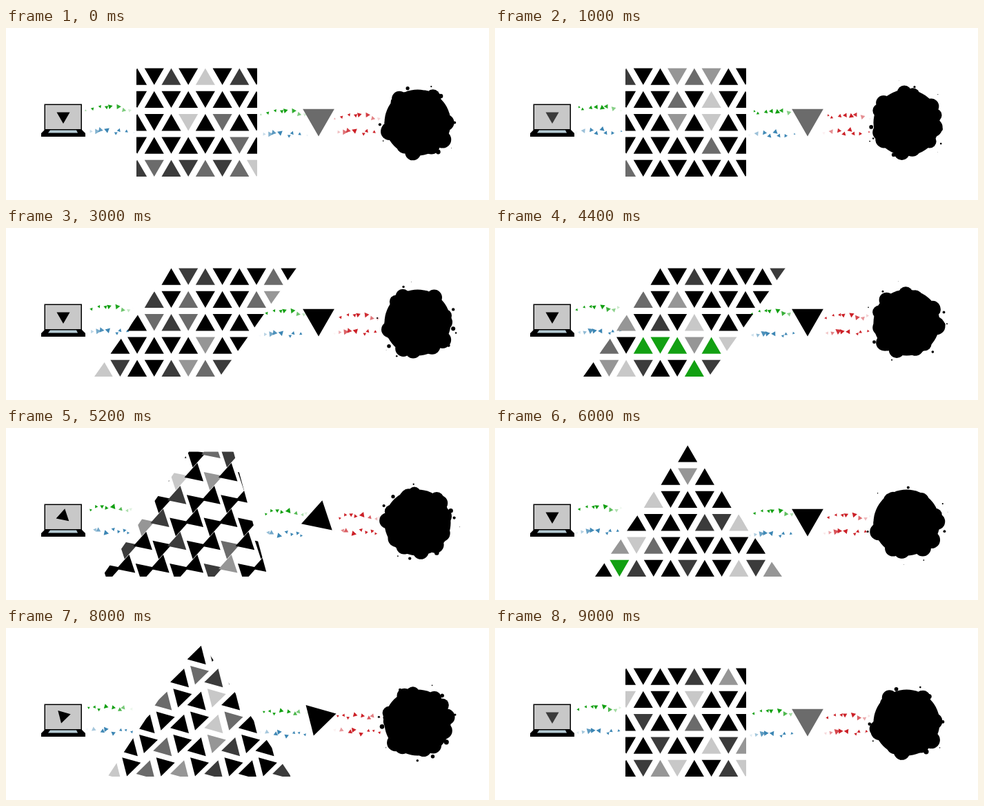
Write an HTML page with a canvas that moves like this. It is 700 by 250 pixels and loops after 9100 ms.

```html
<!DOCTYPE html>
<html>
<head>
<meta charset="utf-8">
<style>
html, body { margin: 0; width: 100%; height: 100%; overflow: hidden; background: #fff; }
canvas { display: block; }
</style>
</head>
<body>
<canvas id="stage" width="700" height="250"></canvas>
<script>
const ctx = document.getElementById('stage').getContext('2d');
const TAU = Math.PI * 2, LOOP = 9100, STEP = 100;
const GREEN = '#12a012', BLUE = '#0b7ab5', LAKE = '#3c86b4', RED = '#cc2027';
const GRAYS = ['#000', '#3b3b3b', '#6b6b6b', '#969696', '#c8c8c8'];

// Clip outlines (top left, top right, bottom right, bottom left) and lattice shift
const POSES = [
  { pts: [[189, 58], [364, 58], [364, 216], [189, 216]], shift: 0 },
  { pts: [[239, 58], [421, 58], [310, 216], [128, 216]], shift: 0 },
  { pts: [[279, 22], [281, 22], [416, 216], [145, 216]], shift: 15 }
];
const TURN_START = 1650, TURN_GAP = 3015, TURN_TIME = 1000;

// Coloured patches that swell and shrink again inside the lattice
const PATCHES = [
  { time: 1900, x: 252, y: 176, size: 66, color: BLUE },
  { time: 4400, x: 270, y: 196, size: 64, color: GREEN },
  { time: 6000, x: 166, y: 206, size: 24, color: GREEN }
];
const PATCH_LIFE = 700;

const rand = n => { const s = Math.sin(n * 127.1 + 11.7) * 43758.5453; return s - Math.floor(s); };
const mix = (a, b, k) => a + (b - a) * k;
const easeInOut = (u, p) => u < .5 ? (2 * u) ** p / 2 : 1 - (2 - 2 * u) ** p / 2;

function disc(x, y, r) {
  ctx.beginPath();
  ctx.arc(x, y, r, 0, TAU);
  ctx.fill();
}

function polygon(pts) {
  ctx.beginPath();
  pts.forEach(([x, y]) => ctx.lineTo(x, y));
  ctx.closePath();
}

function triangle(x, y, r, angle, color) {
  polygon([0, 1, 2].map(i => {
    const a = angle + i * TAU / 3;
    return [x + r * Math.sin(a), y - r * Math.cos(a)];
  }));
  ctx.fillStyle = color;
  ctx.fill();
}

// Mostly black, more rarely lighter
const flicker = (t, seed) => GRAYS[Math.floor(4.9 * rand(seed + t * .37) ** 3.2)];

function cellColor(t, x, y, seed) {
  const patch = PATCHES.find(p => {
    const life = 1 - (Math.abs(t - p.time) / PATCH_LIFE) ** 2;
    return life > 0 && Math.hypot((x - p.x) * .85, (y - p.y) * 1.4) < p.size * life;
  });
  return patch && rand(seed + patch.time) < .8 ? patch.color : flicker(t, seed);
}

function turnAt(t) {
  const k = Math.floor((t - TURN_START) / TURN_GAP);
  const u = k < 0 ? 1 : Math.min(1, (t - TURN_START - k * TURN_GAP) / TURN_TIME);
  const from = POSES[(k + 3) % 3], to = POSES[(k + 4) % 3], m = easeInOut(u, 5);
  return {
    spin: easeInOut(u, 3) * TAU / 3,
    shift: mix(from.shift, to.shift, m),
    pts: from.pts.map((p, i) => p.map((v, j) => mix(v, to.pts[i][j], m)))
  };
}

function drawLattice(t, { spin, shift, pts }) {
  ctx.save();
  polygon(pts);
  ctx.clip();
  for (let row = 0; row < 6; row++) for (let col = -6; col < 10; col++) {
    const up = (row + col) % 2 !== 0;
    const x = 239.5 + shift + col * 24.7;
    const y = 25.2 + row * 33.3 + (up ? 16.2 : 8.1);
    const color = cellColor(t, x, y, row * 17 + col + 5);
    triangle(x, y, 16.2, spin + (up ? 0 : Math.PI), color);
  }
  ctx.restore();
}

function drawLaptop(spin, color) {
  ctx.fillStyle = '#000';
  ctx.fillRect(55.5, 110.5, 54.5, 40);
  polygon([[56, 148], [110, 148], [115, 153], [115, 158], [51, 158], [51, 153]]);
  ctx.fill();
  ctx.fillStyle = '#c8c8c8';
  ctx.fillRect(57, 112, 51.5, 35);
  polygon([[64, 148.5], [102, 148.5], [104, 152.5], [61, 152.5]]);
  ctx.fillStyle = '#b4cad3';
  ctx.fill();
  triangle(83, 128, 11, spin + Math.PI, color);
}

// Packets grow on their way, then shrink and fade out
function drawLane(t, x0, y0, dir, seed, color) {
  for (let i = 0; i < 8; i++) {
    const n = seed + i;
    const u = (t * 6 / LOOP + i / 8 + rand(n) * .08) % 1;
    const fade = Math.min(1, (1 - u) / .35);
    const x = x0 + dir * u * 70;
    const y = y0 + 3 * Math.sin(u * 5 + rand(n + 30) * TAU);
    const r = (2 + 4.5 * u) * mix(.75, 1.1, rand(n + 60)) * mix(.4, 1, fade);
    ctx.globalAlpha = Math.min(fade, u * 20);
    triangle(x, y, r, rand(n + 90) * TAU + u * 4, color);
  }
  ctx.globalAlpha = 1;
}

function drawBlob(t) {
  const cx = 596.5, cy = 137.5, w = t / LOOP * TAU;
  ctx.fillStyle = '#000';
  disc(cx, cy, 48);
  for (let i = 0; i < 17; i++) {
    const a = i / 17 * TAU + .25 * Math.sin(w * 3 + i * 2);
    const d = 41 + 3 * Math.sin(w * (5 + i % 4) + i * 1.9);
    disc(cx + d * Math.cos(a), cy + d * Math.sin(a), 8.5 + 4 * rand(i + 7));
  }
  for (let i = 0; i < 10; i++) {
    const u = (t * 7 / LOOP + rand(i + 40)) % 1;
    const a = i * 2.4 + .3 * Math.sin(w + i), d = 50 + 13 * u;
    disc(cx + d * Math.cos(a), cy + d * Math.sin(a), (1 - u) * (1.5 + 3 * rand(i + 80)));
  }
}

// The big triangle is gray around the loop point and darkens towards the middle
function bigColor(t) {
  const glow = Math.cos(t / LOOP * TAU - .5);
  return GRAYS[glow > .8 ? 2 : glow > .5 ? 1 : 0];
}

function draw(t) {
  const turn = turnAt(t);
  ctx.fillStyle = '#fff';
  ctx.fillRect(0, 0, 700, 250);
  drawLane(t, 114, 117, 1, 5, GREEN);
  drawLane(t, 368, 123, 1, 5, GREEN);
  drawLane(t, 475, 129, 1, 5, RED);
  drawLane(t, 186, 150, -1, 205, LAKE);
  drawLane(t, 437, 154, -1, 205, LAKE);
  drawLane(t, 545, 151, -1, 205, RED);
  drawLattice(t, turn);
  drawLaptop(turn.spin, flicker(t, 301));
  triangle(453, 131, 26.4, turn.spin + Math.PI, bigColor(t));
  drawBlob(t);
}

function tick() {
  draw(Math.floor(performance.now() % LOOP / STEP) * STEP);
  requestAnimationFrame(tick);
}
tick();
</script>
</body>
</html>
```
